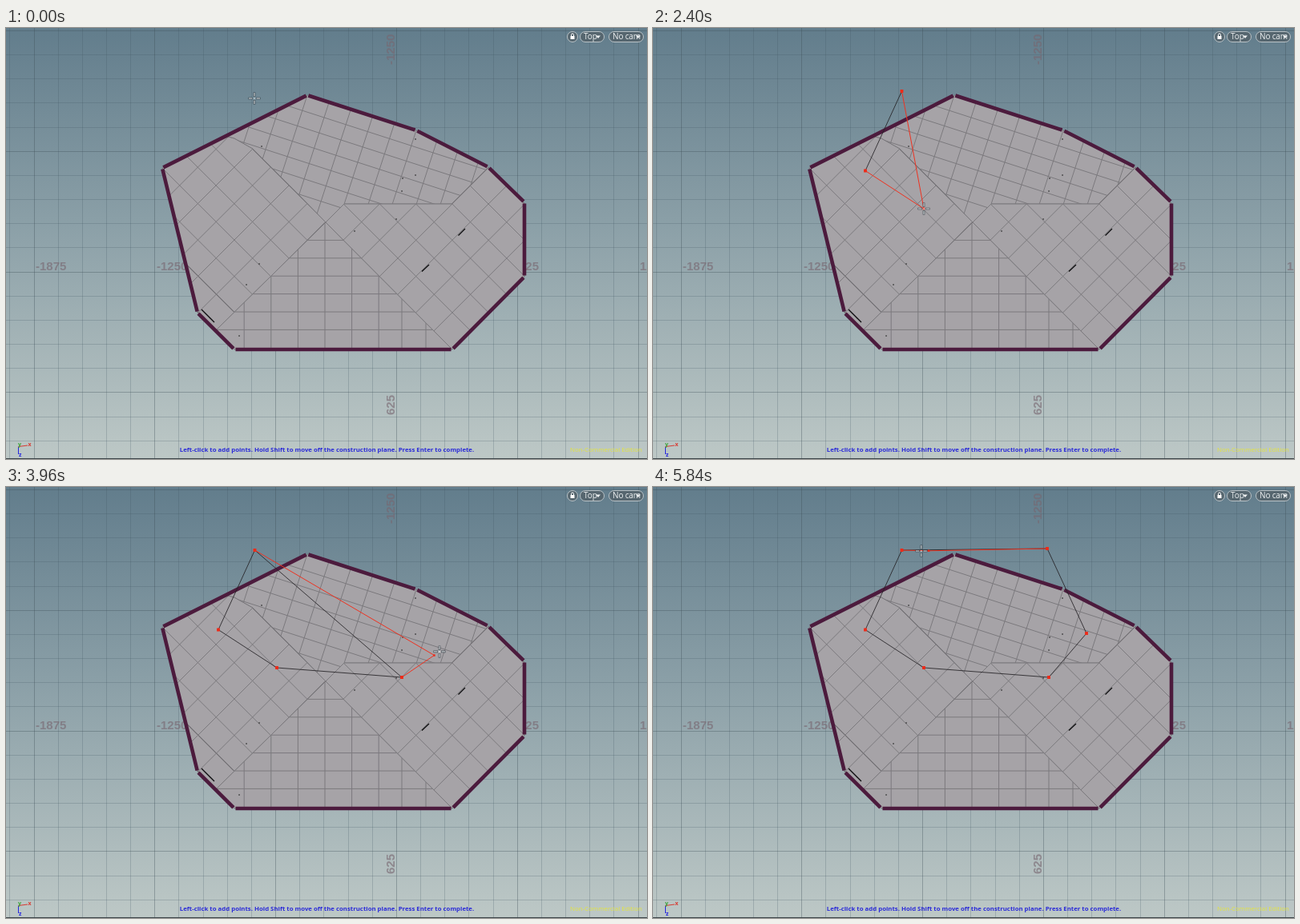
An HTML page for the animation above (5880 ms loop, 800 by 539 pixels).

```html
<!DOCTYPE html>
<html lang="en">
<head>
<meta charset="utf-8">
<title>Drawing a polygon in a top view</title>
<style>
html, body { margin: 0; width: 100%; height: 100%; overflow: hidden; background: #8c9ea5; }
svg { display: block; width: 800px; height: 539px; }
path, polyline { fill: none; }
.axis { font: bold 15px "Liberation Sans", Arial, sans-serif; fill: #77656f; fill-opacity: .62; }
.ui { font: 10px "Open Sans", sans-serif; fill: #eef1f2; }
.hint { font: bold 7.8px "Open Sans", sans-serif; fill: #2b2bd8; text-anchor: middle; }
.note { font: 7.9px "Open Sans", sans-serif; fill: #e4e43c; }
.gizmo { font: bold 7px "Open Sans", sans-serif; }
</style>
</head>
<body>
<svg id="stage" viewBox="0 0 800 539">
  <defs>
    <linearGradient id="sky" x1="0" y1="0" x2="0" y2="1">
      <stop offset="0" stop-color="#627d8c"/>
      <stop offset=".5" stop-color="#8fa3aa"/>
      <stop offset="1" stop-color="#bdc8c6"/>
    </linearGradient>
  </defs>
  <rect width="800" height="539" fill="url(#sky)"/>
  <path id="minor" stroke="#3f5661" stroke-opacity=".24"/>
  <path id="major" stroke="#3f4f58" stroke-opacity=".36"/>
  <g class="axis">
    <text x="37" y="303">-1875</text>
    <text x="188" y="303">-1250</text>
    <text x="640" y="303">625</text>
    <text x="791" y="303">1250</text>
    <text transform="translate(485 46) rotate(-90)">-1250</text>
    <text transform="translate(485 484) rotate(-90)">625</text>
  </g>
  <g id="roof"></g>
  <path d="M244 352L260 368M519 304.500L528 296M564.500 259.500L573 251" stroke="#0c0c0e" stroke-width="1.300"/>
  <path id="specks" stroke="#222" stroke-width="1.300"/>

  <g fill="#56666f" stroke="#b9c2c6">
    <circle cx="707" cy="11" r="6.500"/>
    <rect x="716.500" y="4.500" width="30" height="13" rx="6.500"/>
    <rect x="752.500" y="4.500" width="43" height="13" rx="6.500"/>
  </g>
  <rect x="704.500" y="10" width="5" height="4" fill="#fff"/>
  <path d="M705.500 10V8.500a1.500 1.500 0 0 1 3 0V10" stroke="#fff"/>
  <g class="ui">
    <text x="721" y="14.300">Top</text>
    <text x="757" y="14.300" letter-spacing="-.15">No cam</text>
    <path d="M736 9.500h6l-3 3.500zM786 9.500h6l-3 3.500z" style="fill:#eef1f2"/>
  </g>
  <text class="hint" x="400.500" y="530">Left-click to add points. Hold Shift to move off the construction plane. Press Enter to complete.</text>
  <text class="note" x="704" y="530">Non-Commercial Edition</text>
  <path d="M15.500 523.500V533" stroke="#2525e0"/>
  <path d="M15.500 523.500L27 522" stroke="#d83a32"/>
  <g class="gizmo">
    <text x="27.500" y="523" fill="#d83a32">x</text>
    <text x="15" y="523" fill="#3aa53a">y</text>
    <text x="16" y="536" fill="#2525e0">z</text>
  </g>
  <path d="M0 538.500H800" stroke="#3c4549"/>

  <path id="done" stroke="#252326" stroke-opacity=".85"/>
  <path id="live" stroke="#ee3220"/>
  <path id="dots" style="fill:#ee2a18"/>
  <g id="cursor">
    <path d="M-7.500 0H-2M2 0H7.500M0 -7.500V-2M0 2V7.500" stroke="#263139" stroke-opacity=".8" stroke-width="2.600"/>
    <path d="M-7 0H-2.500M2.500 0H7M0 -7V-2.500M0 2.500V7" stroke="#eef2f3"/>
    <circle r=".8" fill="#eef2f3"/>
  </g>
</svg>
<script>
const $ = id => document.getElementById(id);
const draw = (id, d) => $(id).setAttribute("d", d);

// Construction plane: every fifth line is a major one.
const CELL = 30.16;
let minor = "", major = "";
for (let i = -1; i < 27; i++) {
  const x = Math.round(34.5 + i * CELL) + .5, y = Math.round(3 + i * CELL) + .5;
  const line = `M${x} 0V539M0 ${y}H800`;
  if ((i + 5) % 5 === 0) major += line; else minor += line;
}
draw("minor", minor);
draw("major", major);

// Roof faces, each one a tile grid clipped to its outline.
const range = (from, to, f) => {
  let d = "";
  for (let k = from; k <= to; k++) d += f(k);
  return d;
};
const falling = c => `M${c} 0l539 539`;
const rising = c => `M${c} 0l-539 539`;
const faces = [
  ["195,175 274,135 285,138 308,151 399,243 262,378 239,356",
    range(0, 5, k => falling(156 - 45.4 * k) + rising(641 - 45.5 * k)) + falling(-116) +
    range(0, 4, k => `M0 ${70 + 45.4 * k}l539 539`)],
  ["274,135 376,84 512,128 602,174 556,220 422,220 399,243 364,207 308,151 285,138",
    range(1, 6, k => `M176 ${19.3 + 21.2 * k}l500 161.750`) +
    range(-4, 8, k => `M${376 + 27.2 * k} ${84 + 8.8 * k}l-64.700 200`)],
  ["399,243 557,402 285,402 262,378",
    range(1, 6, k => `M240 ${243 + 22.4 * k}H600`) +
    range(-3, 2, k => `M${398 + 33.6 * k} 240V402`) + "M494 240V402M524 240V402"],
  ["399,243 422,220 556,220 602,174 647,219 647,311 557,402",
    range(1, 6, k => falling(156 + 45.2 * k) + rising(641 + 45.3 * k))],
];
$("roof").innerHTML = faces.map(([shape, tiles], i) => `
  <clipPath id="face${i}"><polygon points="${shape}"/></clipPath>
  <polygon points="${shape}" fill="#a6a3a7" stroke="#7b797d"/>
  <path d="${tiles}" clip-path="url(#face${i})" stroke="#7b797d"/>`).join("");

const eaves = [[195, 175], [376, 84], [512, 128], [602, 174], [647, 218],
               [647, 311], [557, 402], [285, 402], [239, 356]];
const rim = eaves.map(([x, y], i) => {
  const [u, v] = eaves[(i + 1) % eaves.length];
  const s = 1.5 / Math.hypot(u - x, v - y), dx = (u - x) * s, dy = (v - y) * s;
  return `M${x + dx} ${y + dy}L${u - dx} ${v - dy}`;
}).join("");
$("roof").innerHTML += `<path d="${rim}" stroke="#4c1b3d" stroke-width="4.600"/>`;

draw("specks", [[319, 148], [511, 139], [495, 188], [511, 184], [494, 204], [487, 239],
  [435, 254], [316, 295], [300, 321], [291, 385]].map(([x, y]) => `M${x - .6} ${y}h1.300`).join(""));

// Pointer path: time, x, y.
const LOOP = 5880, LAG = 40;
const path = [
  [0, 310, 88], [80, 310, 88], [200, 310.5, 79], [920, 310.5, 79], [1120, 304, 92],
  [1280, 289, 118], [1480, 273, 157], [1680, 265, 178.5], [1880, 265, 178.5],
  [2120, 302, 206], [2360, 338, 226], [2480, 338, 226], [2880, 405, 246],
  [3160, 456, 254], [3280, 477, 251], [3560, 494, 238], [3680, 494, 238],
  [3960, 541, 206], [4200, 541, 183], [4440, 541, 183], [4680, 507, 117],
  [4960, 492, 77], [5120, 492, 77], [5480, 420, 78], [5840, 335, 80], [LOOP, 330, 80],
];
// Clicked points: time, x, y.
const clicks = [[400, 310.5, 79], [1760, 265, 178.5], [2440, 338, 226],
                [3640, 494, 238], [4280, 541, 183], [5080, 492, 77]];

function pointer(t) {
  const i = Math.max(1, path.findIndex(p => p[0] > t));
  const [t0, x0, y0] = path[i - 1], [t1, x1, y1] = path[i];
  const k = Math.max(0, (t - t0) / (t1 - t0));
  return [x0 + (x1 - x0) * k, y0 + (y1 - y0) * k];
}

function frame() {
  const t = performance.now() % LOOP;
  const points = clicks.filter(c => c[0] <= t).map(c => c.slice(1));
  const n = points.length, tip = pointer(t - LAG);
  $("cursor").setAttribute("transform", `translate(${pointer(t)})`);
  draw("done", n > 1 ? `M${points.join("L")}${n > 2 ? "Z" : ""}` : "");
  draw("live", n ? `M${points[n - 1]}L${tip}L${points[0]}` : "");
  const square = (p, r) => `M${p[0] - r} ${p[1] - r}h${2 * r}v${2 * r}h${-2 * r}z`;
  draw("dots", n ? points.map(p => square(p, 1.9)).join("") + square(tip, 1.2) : "");
  requestAnimationFrame(frame);
}
frame();
</script>
</body>
</html>
```
